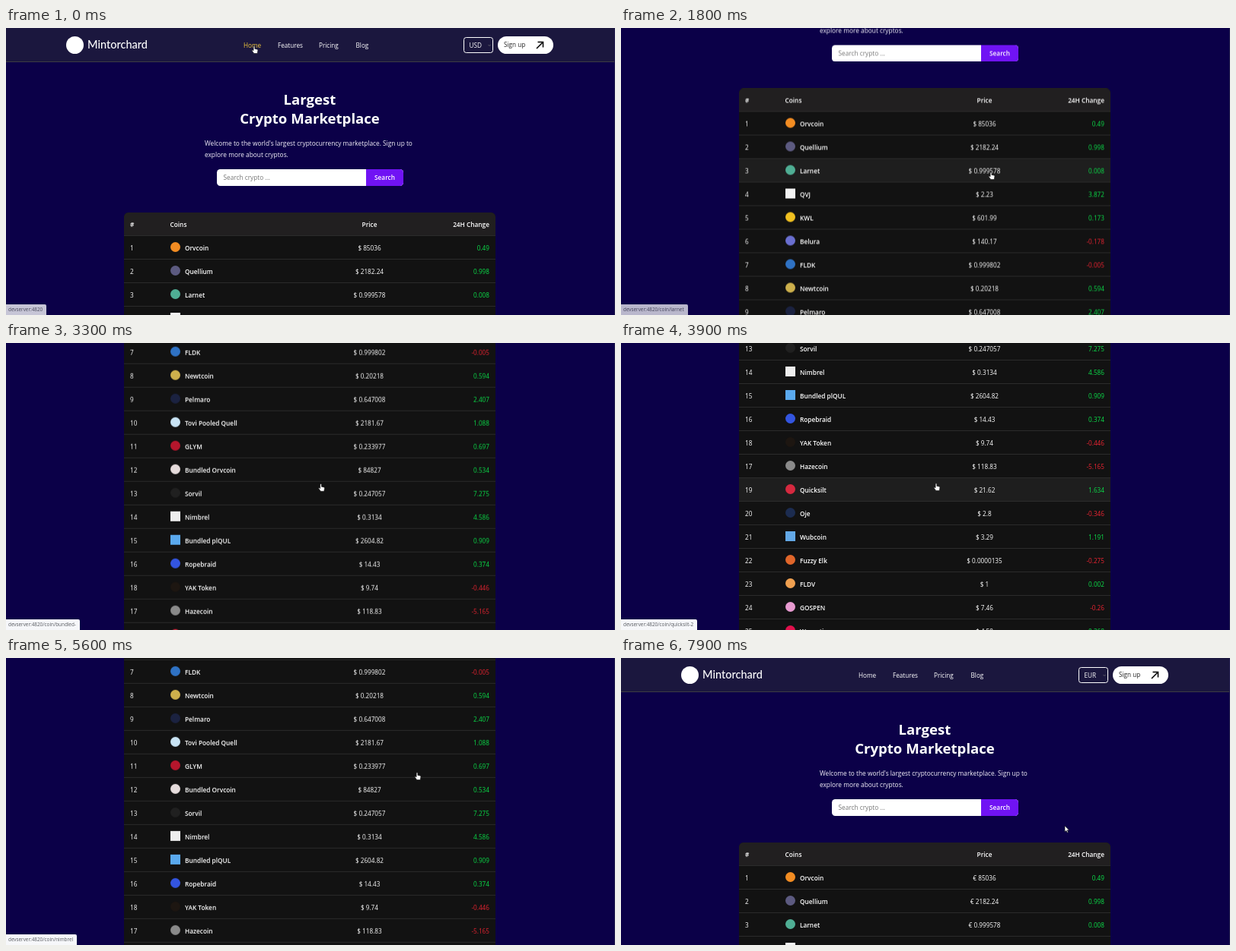
An HTML page that plays this animation: 800x378 px, repeating every 8 s.

```html
<!DOCTYPE html>
<html lang="en">
<head>
<meta charset="utf-8">
<title>Crypto marketplace</title>
<style>
html, body { margin: 0; width: 100%; height: 100%; overflow: hidden; background: #0b0048; }
#stage { position: relative; width: 800px; height: 378px; overflow: hidden; background: #0b0048;
  color: #fff; font: 500 8.2px/16px "Open Sans", "Noto Sans", sans-serif; white-space: nowrap; }
#stage * { box-sizing: border-box; }
#page { position: absolute; inset: 0; will-change: transform; }
#page > *, header > *, .row > * { position: absolute; }
header { left: 0; top: 0; width: 800px; height: 45.4px; background: #1b173e; border-bottom: 1px solid #3c3c44; }
.mark { left: 79px; top: 10.5px; width: 23px; height: 23px; border-radius: 50%; background: #fff; }
.brand { left: 107px; top: 13px; font: 500 14.5px/18px Lato, sans-serif; }
nav span { position: absolute; top: 14.5px; }
nav .on { color: #f3c93c; }
.select { left: 601px; top: 12px; width: 39px; height: 20.5px; padding-left: 6.5px; line-height: 19px;
  border: 1.2px solid #fff; border-radius: 3.5px; }
.chevron { left: 633px; top: 20.5px; }
.signup { left: 646px; top: 11px; width: 73px; height: 22.5px; padding-left: 8px; line-height: 22.5px;
  border-radius: 12px; background: #fff; color: #222; }
.arrow { left: 696px; top: 17px; }
h1 { left: 199px; top: 80.8px; width: 400px; margin: 0; text-align: center; font-size: 18.6px; line-height: 25px; font-weight: 700; }
p { left: 261px; top: 143.5px; margin: 0; font-size: 8.33px; font-weight: 400; line-height: 15.2px; color: #f4f2fa; }
.search { left: 277px; top: 186.2px; width: 245px; height: 22.2px; border-radius: 4.5px; overflow: hidden;
  background: #fff; color: #777; line-height: 22.5px; padding-left: 8.5px; font-size: 8.3px; font-weight: 400; }
.search b { position: absolute; right: 0; top: 0; width: 49px; height: 100%; background: #7013f4; color: #fff;
  text-align: center; font-weight: 600; }
.table { left: 154.7px; top: 242.7px; width: 488.6px; border-radius: 6px; overflow: hidden; background: #121212; }
.row { position: relative; height: 31px; line-height: 31.4px; border-bottom: 1px solid #2b2b2b; }
.row.head { background: #211f20; font-weight: 600; font-size: 8.3px; }
.row.on { background: #1e1e1e; }
.n { left: 8.3px; }
.coin { left: 80.3px; font-weight: 600; font-size: 8.3px; }
.head .coin { left: 60.8px; }
.icon { left: 61.2px; top: 8.8px; width: 13px; height: 13px; }
.price { left: 222.8px; width: 200px; text-align: center; }
.change { right: 8.3px; }
.up { color: #0be04a; }
.down { color: #ec2432; }
.menu { position: absolute; left: 601px; top: 33px; width: 39px; background: #09005c; border: .6px solid #777; line-height: 12px; }
.menu div { padding-left: 6px; }
.menu .on { background: #1967d2; }
.edge { position: absolute; right: 0; top: 0; width: 1px; height: 100%; background: #25204f; }
.status { position: absolute; left: 0; bottom: 0; height: 14px; padding: 0 5px 0 3px; line-height: 14px;
  font-size: 6.35px; font-weight: 400; color: #55585e; background: #f6f7fa; border-top-right-radius: 2px; }
.cursor { position: absolute; left: 0; top: 0; overflow: visible; }
</style>
</head>
<body>
<div id="stage">
  <div id="page">
    <header>
      <div class="mark"></div>
      <div class="brand">Mintorchard</div>
      <nav></nav>
      <div class="select">USD</div>
      <svg class="chevron" width="4" height="4"><path d="M.5 1 2 2.6 3.5 1" fill="none" stroke="#777" stroke-width=".7"/></svg>
      <div class="signup">Sign up</div>
      <svg class="arrow" width="11" height="11"><path d="M1 10 9.5 1.5M2.5 1.5H9.5V8.5" fill="none" stroke="#000" stroke-width="1.5"/></svg>
    </header>
    <h1>Largest<br>Crypto Marketplace</h1>
    <p>Welcome to the world's largest cryptocurrency marketplace. Sign up to<br>explore more about cryptos.</p>
    <div class="search">Search crypto ...<b>Search</b></div>
    <div class="table">
      <div class="row head"><span class="n">#</span><span class="coin">Coins</span><span class="price">Price</span><span class="change">24H Change</span></div>
    </div>
  </div>
  <div class="menu"><div>USD</div><div>EUR</div><div>INR</div></div>
  <div class="edge"></div>
  <div class="status"></div>
  <svg class="cursor" width="10" height="12" stroke="#111" stroke-width=".6" fill="#fff" stroke-linejoin="round">
    <path id="arrow" d="M0 0V8L1.9 6.3 3.1 9 4.4 8.4 3.2 5.8H5.6Z"/>
    <path id="hand" d="M-.9 1.4Q0 .2.9 1.4V4.4L4 5.1Q5 5.4 4.9 6.6L4.2 10.5H-.2L-2.9 6.9Q-3 5.7-1.9 6L-.9 6.8Z"/>
  </svg>
</div>
<script>
// name | price | change | icon colour | s = square icon
const COINS = `Orvcoin|85036|0.49|#f28c22
Quellium|2182.24|0.998|#5c5a80
Larnet|0.999578|0.008|#4fae94
QVJ|2.23|3.872|#f4f4f4|s
KWL|601.99|0.173|#f0c020
Belura|140.17|-0.178|#6a6fd0
FLDK|0.999802|-0.005|#2f72c4
Newtcoin|0.20218|0.594|#cdb04c
Pelmaro|0.647008|2.407|#1b2240
Tovi Pooled Quell|2181.67|1.088|#c9e4f5
GLYM|0.233977|0.697|#b5162c
Bundled Orvcoin|84827|0.534|#e6dcdc
Sorvil|0.247057|7.275|#202020
Nimbrel|0.3134|4.586|#eeeeee|s
Bundled plQUL|2604.82|0.909|#5aa9ee|s
Ropebraid|14.43|0.374|#3355e0
YAK Token|9.74|-0.446|#1d1611
Hazecoin|118.83|-5.165|#8a8a8a
Quicksilt|21.62|1.634|#d5293f
Oje|2.8|-0.346|#1c2c50
Wubcoin|3.29|1.191|#63a8e6|s
Fuzzy Elk|0.0000135|-0.275|#e0662a
FLDV|1|0.002|#f0a050
GOSPEN|7.46|-0.26|#e79ad0
Wavestip|4.59|0.368|#e0104c
BQUL|2180.64|0.838|#e6e0ea
Orvcoin Bank|315.85|2.014|#18c97e
Ultraviscid|18.54|-3.624|#0f3a35
Pelith FLDo|0.999047|0.028|#6e6e6e
Nabfox Token|4.09|2.423|#7ff0e0
Bundled eQUL|2315.5|1.101|#5b48c0
Bartrix|7.22|0.367|#7a1428
Lusito|223.69|2.285|#e8642a
GreenNUB Coin|26.44|0.137|#e6b03c
WIDE Protocol|3.18|1.941|#3ff09a|s
Gelmo|6.18|-4.58|#eeeeee
Ruv|0.999528|-0.025|#f5b632
Tessil|0.8214|0.412|#3ff06a|s
Ombrix|47.92|1.306|#4a7de0
Fennarc|17.05|-0.731|#9a58d8`.split("\n").map(line => line.split("|"));
const SLUGS = { QVJ: "quavel", Quicksilt: "quicksilt-2" };
const HOST = "devserver:4820";
const NAV = [["Home", 312, 336], ["Features", 357, 390], ["Pricing", 411, 438], ["Blog", 459.5, 477]];
const LOOP = 8000, STEP = 100, ROW = 31, FIRST = 273.7, NOTCH = 54.5;

const $ = sel => document.querySelector(sel);
const add = (parent, html) => { parent.insertAdjacentHTML("beforeend", html); return parent.lastElementChild; };

const links = NAV.map(([name, x]) => add($("nav"), `<span style="left:${x}px">${name}</span>`));
const rank = i => i === 16 ? 18 : i === 17 ? 17 : i + 1;
const rows = COINS.map(([name, , change, colour, shape], i) => add($(".table"),
  `<div class="row"><span class="n">${rank(i)}</span>
  <i class="icon" style="background:${colour};border-radius:${shape ? 0 : "50%"}"></i>
  <span class="coin">${name}</span><span class="price"></span>
  <span class="change ${change < 0 ? "down" : "up"}">${change}</span></div>`));
const prices = rows.map(row => row.querySelector(".price"));
const options = [...$(".menu").children];

const clamp = x => Math.min(1, Math.max(0, x));
const ease = x => (x = clamp(x), x * x * (3 - 2 * x));

// Piecewise eased track of [time, ...values]
function track(keys, t) {
  const k = keys.findIndex(key => key[0] > t);
  if (k < 0) return keys[keys.length - 1].slice(1);
  if (k === 0) return keys[0].slice(1);
  const a = keys[k - 1], b = keys[k], f = ease((t - a[0]) / (b[0] - a[0]));
  return a.slice(1).map((v, i) => v + (b[i + 1] - v) * f);
}

const POINTER = [[0, 326, 23], [300, 372, 23], [550, 424, 24], [750, 468, 25], [1000, 515, 95], [1300, 486, 189],
  [1800, 486, 189], [2500, 413, 186], [3900, 414, 184], [4600, 479, 195], [5000, 479, 195], [5600, 540, 150],
  [6200, 567, 140], [6700, 620, 23], [6950, 620, 23], [7200, 618, 51], [7400, 618, 51], [7850, 583, 221]];
const STATUS = [[0, .8], [100, 1], [750, 1], [1000, 0], [1700, 0], [1850, 1], [6000, 1], [6200, .75], [6500, 0]];

// Wheel notches: a few down, faster down, then all the way up
const DOWN = [1250, 1400, 1550, 2050, 2250,
  ...Array.from({ length: 7 }, (_, i) => 2750 + i * 150),
  ...Array.from({ length: 7 }, (_, i) => 3970 + i * 105), 4727];
const UP = DOWN.map((_, i) => 5000 + i * 45);
const notches = (list, t) => list.reduce((sum, at) => sum + ease((t - at) / 200), 0);
const scrollAt = t => NOTCH * (notches(DOWN, t) - notches(UP, t));

function rowAt(t) {
  const [x, y] = track(POINTER, t);
  const i = Math.floor((y + scrollAt(t) - FIRST) / ROW);
  return x > 155 && x < 643 && i < rows.length ? i : -1;
}

function statusText(t) {
  const i = t < 1100 ? -1 : rowAt(Math.min(t - 60, 5790));
  if (i < 0) return HOST;
  const name = COINS[i][0];
  return `${HOST}/coin/${SLUGS[name] || name.toLowerCase().replace(/ .*/, "-")}`;
}

let shown;
function setCurrency(euro) {
  if (shown === euro) return;
  shown = euro;
  $(".select").textContent = euro ? "EUR" : "USD";
  prices.forEach((el, i) => el.textContent = `${euro ? "€" : "$"} ${COINS[i][1]}`);
}

function draw(t) {
  const y0 = scrollAt(t), [x, y] = track(POINTER, t);
  const still = Math.abs(scrollAt(t + 20) - scrollAt(t - 20)) < 4;
  const hover = rowAt(t);
  const link = y0 < 1 && y > 14 && y < 32 ? NAV.findIndex(([, a, b]) => x >= a && x <= b) : -1;
  $("#page").style.transform = `translateY(${-y0}px)`;
  rows.forEach((row, i) => row.classList.toggle("on", still && i === hover));
  links.forEach((el, i) => el.classList.toggle("on", i === link));
  setCurrency(t >= 7400);

  $(".menu").style.display = t >= 6900 && t < 7400 ? "" : "none";
  options.forEach((el, i) => el.classList.toggle("on", i === (y > 45 ? 1 : 0)));

  $(".status").textContent = statusText(t);
  $(".status").style.opacity = track(STATUS, t)[0];

  const hand = hover >= 0 || link >= 0;
  $("#hand").style.display = hand ? "" : "none";
  $("#arrow").style.display = hand ? "none" : "";
  $(".cursor").style.transform = `translate(${x}px, ${y}px)`;
}

function frame() {
  const t = performance.now() % LOOP;
  draw(Math.floor(t / STEP) * STEP);
  requestAnimationFrame(frame);
}
frame();
</script>
</body>
</html>
```
